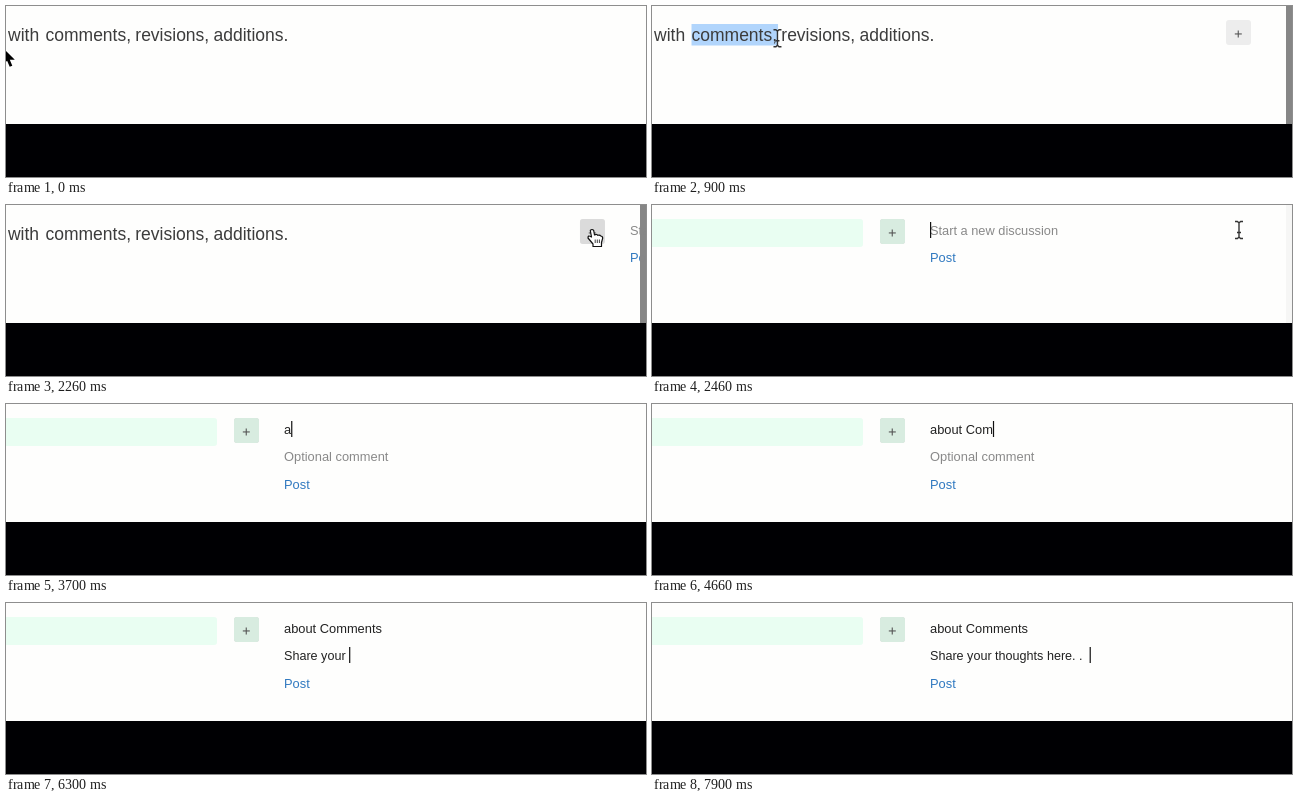
An HTML page with a canvas for the animation above (8000 ms loop, 640x171 px).

```html
<!DOCTYPE html>
<html lang="en">
<head>
<meta charset="utf-8">
<title>Start a discussion</title>
<style>
html, body { margin: 0; width: 100%; height: 100%; overflow: hidden; background: #000003; }
canvas { display: block; }
</style>
</head>
<body>
<canvas id="stage" width="640" height="171"></canvas>
<script>
const ctx = document.getElementById('stage').getContext('2d');
const LOOP = 8000, SHIFT = 346;
const ARROW = new Path2D('M0 0V15.5L3.6 12.2 6.2 18.3 8.8 17.2 6.3 11.3H11.3Z');
const BEAM = new Path2D('M-4-8.5H-1.5L0-7 1.5-8.5H4M-4 8.5H-1.5L0 7 1.5 8.5H4M0-7V7M-2 2.5H2');
const HAND = new Path2D('M-1.5 7L-2.7.5Q-1-1.5.7.5L1.5 5Q4 3.8 4.6 5.3 7 4.5 7.7 6 9.7 6 9.7 8.2L8.5 12.5V16.5H0V14L-5 8Q-5 5-2.5 6.5Z');
const KNUCKLES = new Path2D('M2.2 9.5V13M4.3 9.5V13M6.4 9.5V13');
const WORDS = [['with', 2], ['comments,', 39.5], ['revisions,', 129.3], ['additions.', 207.5]];
const CARET_OFF = [[2660, 3030], [3360, 3660], [4430, 4500], [7760, 7900]];

const ramp = (t, a, b) => Math.min(1, Math.max(0, (t - a) / (b - a)));
const smooth = u => u * u * (3 - 2 * u);
const mix = (a, b, u) => a + (b - a) * u;

function rect(x, y, w, h, color, alpha = 1, r = 0) {
  ctx.globalAlpha = alpha;
  ctx.fillStyle = color;
  ctx.beginPath();
  ctx.roundRect(x, y, w, h, r);
  ctx.fill();
  ctx.globalAlpha = 1;
}

function setFont(size) {
  ctx.font = size + 'px "Liberation Sans", Arial, sans-serif';
}

function text(str, x, y, size, color) {
  setFont(size);
  ctx.fillStyle = color;
  ctx.fillText(str, x, y);
  return ctx.measureText(str).width;
}

// First key lands at a, last key at b
function typed(str, t, a, b) {
  const n = t < a ? 0 : Math.floor((t - a) / (b - a) * (str.length - 1) + 1.0001);
  return str.slice(0, n);
}

function pointer(t) {
  const arrive = smooth(ramp(t, 0, 330));
  const drag = 1 - (1 - ramp(t, 700, 1030)) ** 2.2;
  const leave = smooth(ramp(t, 1330, 2100));
  return {
    x: mix(-2.5, 39, arrive) + 99 * drag + 449 * leave,
    y: mix(42.5, 31, arrive) + 1.5 * drag - 7.5 * leave
  };
}

function drawPointer(p, t, slide) {
  ctx.save();
  ctx.translate(p.x, p.y);
  ctx.lineJoin = 'round';
  const overButton = t > 1330 && p.x > 574;
  if (overButton && slide < .3) {
    ctx.fillStyle = '#fff';
    ctx.fill(HAND);
    ctx.strokeStyle = '#111';
    ctx.lineWidth = 1.2;
    ctx.stroke(HAND);
    ctx.lineWidth = .8;
    ctx.stroke(KNUCKLES);
  } else if (p.y > 41 || p.x > 557 && !overButton) {
    ctx.strokeStyle = '#fff';
    ctx.lineWidth = 2;
    ctx.stroke(ARROW);
    ctx.fillStyle = '#000';
    ctx.fill(ARROW);
  } else {
    ctx.strokeStyle = '#333';
    ctx.lineWidth = 1.4;
    ctx.stroke(BEAM);
  }
  ctx.restore();
}

function drawSelection(p, t) {
  if (t < 700 || t >= 2260) return;
  const left = 39.5, str = 'comments, re';
  setFont(17.6);
  let end = 0;
  for (let i = 1; i <= str.length; i++) {
    const before = ctx.measureText(str.slice(0, i - 1)).width;
    const after = ctx.measureText(str.slice(0, i)).width;
    if (Math.min(p.x, 138) - left > (before + after) / 2) end = after;
  }
  rect(left, 18, end && end + .5, 21.5, '#b1d5fc');
}

function drawPage(p, t, slide) {
  ctx.save();
  ctx.translate(-SHIFT * slide, 0);
  rect(-10, 14, 567, 28, '#e9fef2', slide, 3);
  drawSelection(p, t);
  for (const [word, x] of WORDS) text(word, x, 35, 17.5, '#3c3c3c');
  const shown = ramp(t, 30, 200);
  rect(574, 14, 25, 25, '#ededed', shown, 3);
  rect(574, 14, 25, 25, '#dbdbdb', ramp(t, 1950, 2100), 3);
  rect(574, 14, 25, 25, '#d8ece0', slide, 3);
  rect(582.8, 27.4, 7, 1.1, '#555', shown);
  rect(585.7, 24.5, 1.1, 7, '#555', shown);
  ctx.restore();
}

function drawPanel(t, slide) {
  if (!slide) return;
  const x = 278 + SHIFT * (1 - slide);
  const dark = '#222', gray = '#898989';
  const title = typed('about ', t, 3700, 4060) + typed('Comments', t, 4500, 5060);
  const body = typed('Share your ', t, 5600, 6300) + typed('thoughts here.', t, 6430, 7230) +
    typed(' . ', t, 7300, 7400) + (t >= 7900 ? ' ' : '');
  const titleWidth = text(title, x, 29.5, 12.87, dark);
  let bodyWidth = 0;
  if (title) {
    bodyWidth = text(body, x, 57, 12.6, dark);
    if (!body) text('Optional comment', x, 57, 12.87, gray);
  } else {
    text('Start a new discussion', x, 29.5, 12.8, gray);
  }
  text('Post', x, title ? 84.5 : 57, 12.87, '#3079c0');
  if (slide === 1 && !CARET_OFF.some(([a, b]) => t >= a && t < b)) {
    const second = t >= 5300;
    rect(x + (second ? bodyWidth : titleWidth), second ? 44 : 17, 1.2, 16, '#111');
  }
}

function draw(t) {
  const slide = smooth(ramp(t, 2260, 2440));
  const p = pointer(t);
  rect(0, 0, 640, 171, '#fefefd');
  drawPage(p, t, slide);
  drawPanel(t, slide);
  if (t >= 500) rect(634, 0, 6, 118, '#868686', (1 - ramp(t, 2260, 2500)) ** 1.5);
  if (t < 3700) drawPointer(p, t, slide);
  rect(0, 118, 640, 53, '#000003');
}

const start = performance.now();
function frame() {
  draw((performance.now() - start) % LOOP);
  requestAnimationFrame(frame);
}
frame();
</script>
</body>
</html>
```
